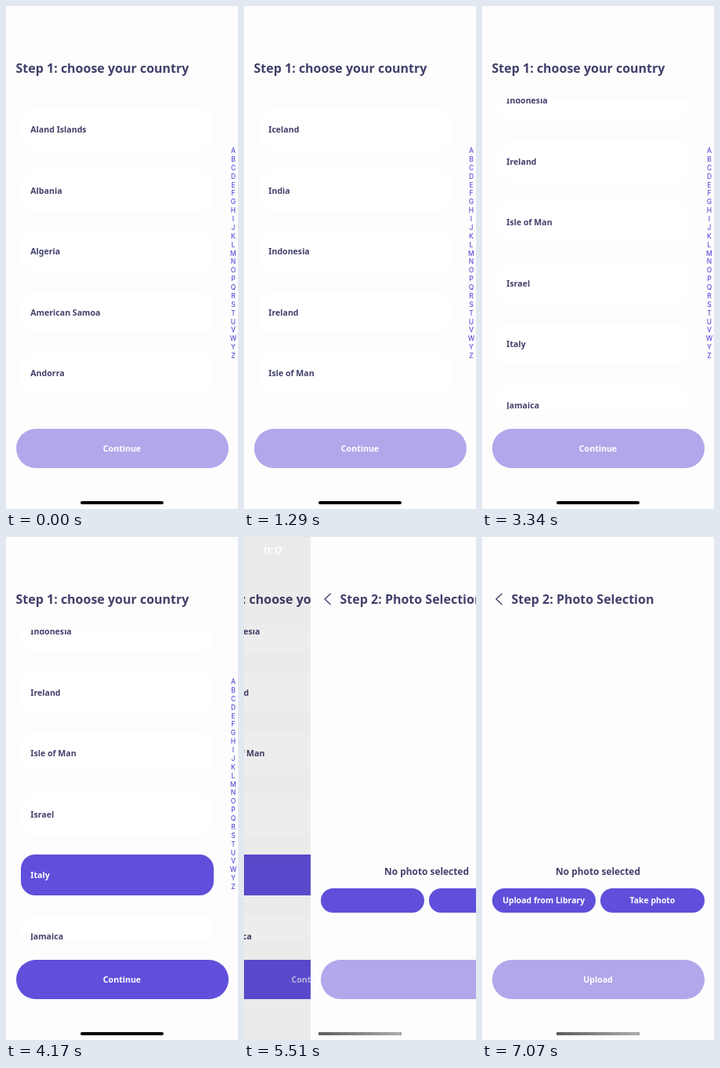
Write an HTML page that moves like this. It is 296 by 640 pixels and loops after 8000 ms.

```html
<!DOCTYPE html>
<html lang="en">
<head>
<meta charset="utf-8">
<title>Country picker</title>
<style>
  @property --x { syntax: "<number>"; inherits: true; initial-value: 296; }

  html, body { margin: 0; width: 100%; height: 100%; overflow: hidden; background: #fdfdfd; }
  body {
    --violet: #604fda;
    --pale: #b0a8ea;
    --ink: #41406b;
    position: relative;
    font: 700 10.6px "Noto Sans", sans-serif;
    color: var(--ink);
    white-space: nowrap;
    animation: push 8s step-end infinite;
  }
  body * { position: absolute; box-sizing: border-box; }
  script { display: none; }

  .screen, .dim { left: 0; top: 0; width: 296px; height: 640px; }
  .screen { background: #fdfdfd; overflow: hidden; }
  .country { transform: translateX(calc((var(--x) - 296) * .3px)); }
  .dim { background: #000; opacity: calc((296 - var(--x)) / 2960); }
  .photo { transform: translateX(calc(var(--x) * 1px)); }

  h1 { margin: 0; left: 12.5px; top: 67px; font-size: 16px; line-height: 24px; }
  .photo h1 { left: 37.5px; }

  .list { left: 0; top: 118px; width: 280px; height: 395px; overflow: hidden; }
  .track { left: 19px; top: 13px; width: 246px; animation: browse 8s step-end infinite; }
  .row {
    width: 246px; height: 52px; padding-left: 12.3px;
    border-radius: 18px; background: #fff; line-height: 52px;
  }
  .picked { animation: pick 8s step-end infinite; }

  .index span {
    left: 280px; width: 20px; text-align: center;
    font: 500 8.5px/10px Inter, sans-serif; color: var(--violet);
  }

  .button { color: #fff; text-align: center; background: var(--violet); }
  .button span { left: 0; width: 100%; animation: appear 8s step-end infinite; }
  .wide { left: 12.5px; top: 537.5px; width: 271px; height: 50.5px; border-radius: 25.25px; line-height: 50.5px; background: var(--pale); }
  .next { animation: enable 8s step-end infinite; }
  .next span { animation-name: press-next; }
  .small { top: 446.5px; width: 132.3px; height: 31px; border-radius: 15.5px; line-height: 31px; font-size: 10.45px; }
  .library { left: 12.5px; }
  .library span { animation-name: press-library; }
  .camera { left: 151.3px; }

  .note { left: 0; top: 416px; width: 296px; text-align: center; font-size: 11.9px; line-height: 19px; }
  .back { left: 16px; top: 71px; fill: none; stroke: var(--ink); stroke-width: 1.3; stroke-linecap: round; stroke-linejoin: round; }
  .clock { left: 24px; top: 11px; font: 600 11.5px/14px Inter, sans-serif; color: #fff; }
  .home { left: 95px; top: 629.5px; width: 106px; height: 4px; border-radius: 2px; background: #000; overflow: hidden; }
  .home i { inset: 0; background: linear-gradient(90deg, #5e5e5e, #acacac); animation: soften 8s step-end infinite; }

  @keyframes push {
    0% { --x: 296; }
    68.875% { --x: 85; }
    70.25% { --x: 18; }
    71.75% { --x: 4; }
    73.125% { --x: .8; }
    82.75%, 100% { --x: 0; }
  }
  /* Jumps of five rows per index letter, then one drag. */
  @keyframes browse {
    0% { transform: translateY(0); }
    6.25% { transform: translateY(-387.5px); }
    8.25% { transform: translateY(-775px); }
    10.75% { transform: translateY(-1162.5px); }
    12.25% { transform: translateY(-1550px); }
    14.5% { transform: translateY(-1937.5px); }
    16.125% { transform: translateY(-2325px); }
    31.875% { transform: translateY(-2333px); animation-timing-function: cubic-bezier(.25, .5, .45, 1); }
    41.75%, 100% { transform: translateY(-2517px); }
  }
  @keyframes pick {
    0% { background: #fff; color: var(--ink); }
    52.125%, 100% { background: var(--violet); color: #fff; }
  }
  @keyframes enable {
    0% { background: var(--pale); }
    52.125%, 100% { background: var(--violet); }
  }
  @keyframes press-next {
    0% { opacity: 1; }
    64.125%, 100% { opacity: .65; }
  }
  @keyframes appear {
    0% { opacity: 0; }
    70.25%, 100% { opacity: 1; }
  }
  @keyframes press-library {
    0% { opacity: 0; }
    70.25% { opacity: 1; }
    85.75% { opacity: .5; }
    87.0625% { opacity: .75; }
    88.375%, 100% { opacity: 1; }
  }
  @keyframes soften {
    0% { opacity: 0; }
    67.125%, 100% { opacity: 1; }
  }
</style>
</head>
<body>
  <div class="screen country">
    <h1>Step 1: choose your country</h1>
    <div class="list"><div class="track"></div></div>
    <div class="index"></div>
    <div class="button wide next"><span>Continue</span></div>
  </div>
  <div class="dim"></div>
  <div class="screen photo">
    <svg class="back" width="12" height="16"><path d="M9.3 1.2 2 8l7.3 6.8"/></svg>
    <h1>Step 2: Photo Selection</h1>
    <div class="note">No photo selected</div>
    <div class="button small library"><span>Upload from Library</span></div>
    <div class="button small camera"><span>Take photo</span></div>
    <div class="button wide"><span>Upload</span></div>
  </div>
  <div class="clock">11:17</div>
  <div class="home"><i></i></div>

<script>
  const countries = [
    "Aland Islands, Albania, Algeria, American Samoa, Andorra",
    "Cambodia, Cameroon, Canada, Cape Verde, Cayman Islands",
    "Denmark, Djibouti, Dominica, Dominican Republic, Ecuador",
    "Falkland Islands (Malvinas), Faroe Islands, Fiji, Finland, France",
    "Gabon, Gambia, Georgia, Germany, Ghana",
    "Haiti, Heard Island and McDonald Islands, Holy See (Vatican City State), Honduras, Hong Kong",
    "Iceland, India, Indonesia, Ireland, Isle of Man, Israel, Italy, Jamaica"
  ].join(", ").split(", ");

  function addItems(selector, tag, texts, top, pitch) {
    const parent = document.querySelector(selector);
    return texts.map((text, i) => {
      const item = document.createElement(tag);
      item.textContent = text;
      item.style.top = top + i * pitch + "px";
      return parent.appendChild(item);
    });
  }

  addItems(".track", "div", countries, 0, 77.5).forEach(row => {
    row.className = row.textContent === "Italy" ? "row picked" : "row";
  });
  addItems(".index", "span", [..."ABCDEFGHIJKLMNOPQRSTUVWYZ"], 179, 10.875);
</script>
</body>
</html>
```
